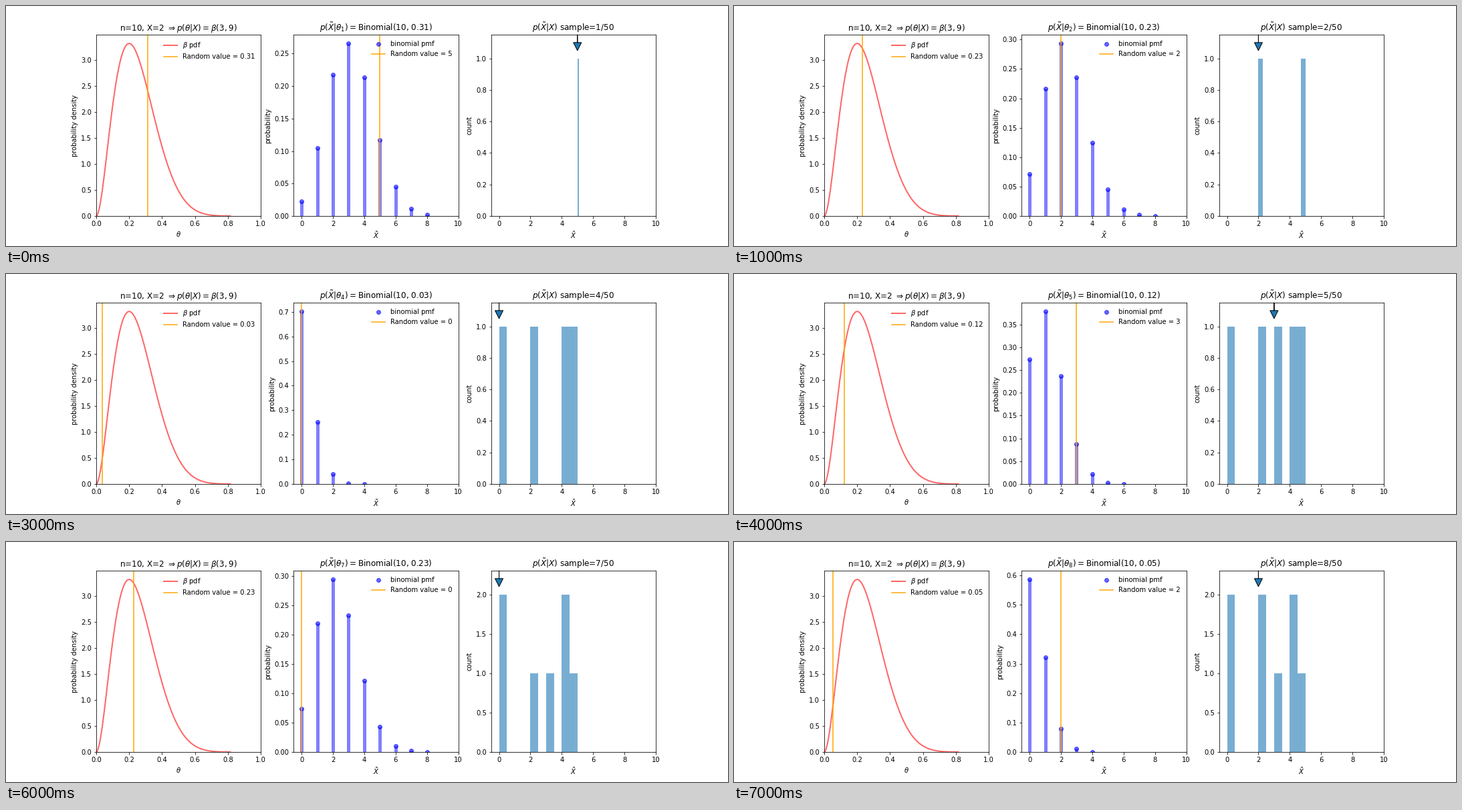
Recreate the animation shown at these times as a matplotlib script. Size 1080 by 360 pixels, loop 8000 ms.

```python
from math import comb

import matplotlib.pyplot as plt
import numpy as np
from matplotlib.animation import FuncAnimation

N, HITS, TOTAL = 10, 2, 50
A, B = HITS + 1, N - HITS + 1
TAIL = 1e-5  # probability left out at the right end of each distribution
THETAS = [0.3145, 0.2315, 0.2505, 0.0348, 0.1218, 0.292, 0.2292, 0.052]
DRAWS = [5, 2, 4, 0, 3, 4, 0, 2]

plt.rcParams["font.family"] = "DejaVu Sans"
fig, (ax_beta, ax_binom, ax_hist) = plt.subplots(1, 3, figsize=(15, 5), dpi=72)
fig.subplots_adjust(left=0.125, right=0.9, bottom=0.125, top=0.88, wspace=0.2)


def beta_pdf(x):
    return A * comb(A + B - 1, A) * x ** (A - 1) * (1 - x) ** (B - 1)


def binom_pmf(p):
    """Counts and their probabilities, without the negligible right tail."""
    pmf = np.array([comb(N, k) * p**k * (1 - p) ** (N - k) for k in range(N + 1)])
    last = int(np.argmax(np.cumsum(pmf) >= 1 - TAIL))
    return np.arange(last), pmf[:last]


def mark_value(ax, value, text):
    ax.axvline(value, color="orange", label=f"Random value = {text}")
    ax.legend(loc="upper right", frameon=False)


def set_labels(ax, title, xlabel, ylabel):
    ax.set_title(title)
    ax.set_xlabel(xlabel)
    ax.set_ylabel(ylabel)


def draw_beta(theta):
    x = np.linspace(0.0039, 0.8144, 100)
    y = beta_pdf(x)
    ax_beta.plot(x, y, "r-", lw=2, alpha=0.6, label=r"$\beta$ pdf")
    mark_value(ax_beta, theta, f"{theta:.2f}")
    ax_beta.set(xlim=(0, 1), ylim=(0, y.max() * 1.05))
    set_labels(ax_beta,
               rf"n={N}, X={HITS} $\Rightarrow p(\theta|X)=\beta({A}, {B})$",
               r"$\theta$", "probability density")


def draw_binom(number, theta, value):
    k, pmf = binom_pmf(theta)
    ax_binom.plot(k, pmf, "bo", alpha=0.6, label="binomial pmf")
    ax_binom.vlines(k, 0, pmf, colors="b", lw=5, alpha=0.5)
    mark_value(ax_binom, value, value)
    ax_binom.set(xlim=(-0.5, N), ylim=(0, pmf.max() * 1.05))
    set_labels(ax_binom,
               rf"$p(\tilde{{X}}|\theta_{number})=$Binomial({N}, {theta:.2f})",
               r"$\tilde{X}$", "probability")


def draw_hist(number, values):
    counts, _, _ = ax_hist.hist(values, bins=10, alpha=0.6)
    peak = counts.max()
    ax_hist.set(xlim=(-0.5, N), ylim=(0, peak * 1.15))
    ax_hist.annotate("", xy=(values[-1], peak * 1.05),
                     xytext=(values[-1], peak * 1.15),
                     arrowprops=dict(width=0.1, headwidth=12, headlength=12))
    set_labels(ax_hist, rf"$p(\tilde{{X}}|X)$ sample={number}/{TOTAL}",
               r"$\tilde{X}$", "count")


def update(i):
    for ax in (ax_beta, ax_binom, ax_hist):
        ax.clear()
    draw_beta(THETAS[i])
    draw_binom(i + 1, THETAS[i], DRAWS[i])
    draw_hist(i + 1, DRAWS[:i + 1])
    return []


anim = FuncAnimation(fig, update, frames=len(DRAWS), init_func=lambda: [],
                     interval=1000, repeat=True, repeat_delay=0)
plt.show()
```
